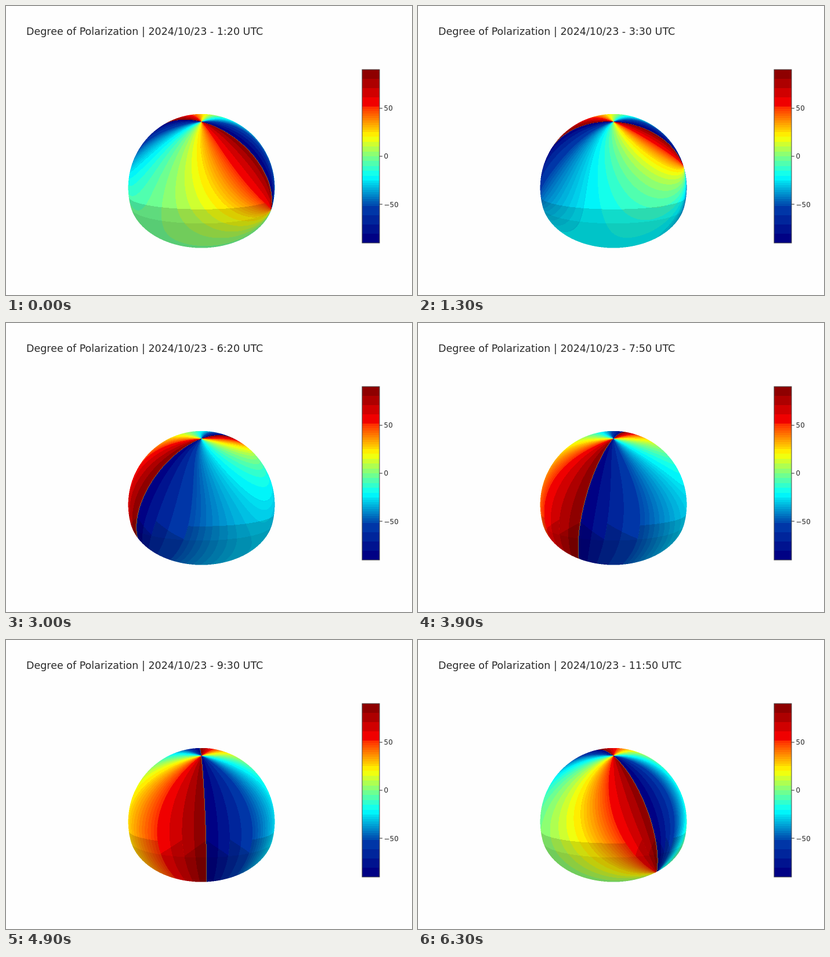
These frames come from a looping animation (700x500 px, 6.4 s). An HTML page with a canvas:

```html
<!DOCTYPE html>
<html>
<head>
<meta charset="utf-8">
<style>
html, body { margin: 0; width: 100%; height: 100%; overflow: hidden; background: #fefefe; }
canvas { display: block; }
</style>
</head>
<body>
<canvas id="stage" width="700" height="500"></canvas>
<script>
const ctx = document.getElementById('stage').getContext('2d');
const { sin, cos, abs, sqrt, floor, min, hypot, PI } = Math;
const RAD = PI / 180;

// Colour scale: angle in degrees, then r, g, b
const STOPS = [
  [-86, 0, 0, 131], [-76, 0, 18, 143], [-66, 0, 37, 155], [-56, 0, 55, 167],
  [-49, 0, 82, 178], [-21, 0, 255, 255], [0, 125, 255, 130], [20, 255, 255, 0],
  [50, 255, 52, 0], [56, 241, 0, 0], [66, 208, 0, 0], [76, 172, 0, 0], [86, 139, 0, 0]
];

function band(v) {
  const a = min(abs(v), 89.9);
  const [base, step] = a > 51.6 ? [51.6, 9.6] : a > 25.2 ? [25.2, 2.4] : [0, 5.04];
  return Math.sign(v) * (base + step * (floor((a - base) / step) + 0.5));
}

function colour(v) {
  v = Math.max(-86, min(86, band(v)));
  let i = 1;
  while (i < STOPS.length - 1 && STOPS[i][0] < v) i++;
  const a = STOPS[i - 1], b = STOPS[i];
  const k = (v - a[0]) / (b[0] - a[0]);
  return [1, 2, 3].map(c => a[c] + (b[c] - a[c]) * k);
}

const PALETTE = Array.from({ length: 901 }, (_, i) => colour((i - 450) / 5 || 0.01));

// Perspective view of a unit dome; axes are front, right, up
const BOX = { x: 206, y: 182, w: 262, h: 240 };
const TILT = 35.26 * RAD, FOCAL = 386.3, DIST = 1.845, RADIUS = 0.63;
const EYE_F = DIST * cos(TILT) / RADIUS;
const EYE_U = (DIST * sin(TILT) + RADIUS / 2) / RADIUS;

function castRay(px, py) {
  const r = (px - 337) / FOCAL, s = (260 - py) / FOCAL;
  const f = -cos(TILT) - sin(TILT) * s, u = -sin(TILT) + cos(TILT) * s;
  const a = f * f + r * r + u * u;
  const b = EYE_F * f + EYE_U * u;
  const disc = b * b - a * (EYE_F ** 2 + EYE_U ** 2 - 1);
  if (disc < 0) return null;
  const t = (-b - sqrt(disc)) / a;
  const F = EYE_F + t * f, R = t * r, U = EYE_U + t * u;
  if (U < 0) return null;
  const h = hypot(F, R) || 1e-6;
  return { c: F / h, s: R / h, h, u: U, light: U * cos(TILT) - F * sin(TILT) };
}

// Point seen in a pixel, with the covered part of the pixel as alpha
function samplePixel(x, y) {
  const hits = [[0.25, 0.25], [0.75, 0.25], [0.25, 0.75], [0.75, 0.75]]
    .map(([dx, dy]) => castRay(x + dx, y + dy)).filter(Boolean);
  if (!hits.length) return null;
  return { ...(castRay(x + 0.5, y + 0.5) || hits[0]), alpha: hits.length / 4 * 255 };
}

const dome = [];
for (let y = 0; y < BOX.h; y++)
  for (let x = 0; x < BOX.w; x++)
    dome.push(samplePixel(BOX.x + x, BOX.y + y));

function sunVector(minutes) {
  const lat = 40 * RAD, dec = -11.4 * RAD;
  const hour = (minutes - 395) / 4 * RAD;
  const south = cos(dec) * cos(hour) * sin(lat) - sin(dec) * cos(lat);
  const west = cos(dec) * sin(hour);
  const up = sin(lat) * sin(dec) + cos(lat) * cos(dec) * cos(hour);
  const k = Math.SQRT1_2;
  return [-k * (south + west), k * (south - west), up];
}

// Angle against the local meridian; the sideways part uses the sun's azimuth only
function polarization(p, [f, r, u]) {
  const along = (r * p.c - f * p.s) / hypot(f, r);
  const rise = u * p.h - p.u * (f * p.c + r * p.s);
  return Math.atan(-rise / (along || 1e-9)) / RAD;
}

function shade(p, v) {
  const a = abs(v);
  const limit = a > 51.6 ? -0.09 - 0.17 * ((90 - a) / 19.2 % 1) : -0.12;
  return p.light < -0.27 ? 0.8 : p.light < limit ? 0.86 : 1;
}

const image = ctx.createImageData(BOX.w, BOX.h);
const SEAM = [130, 200, 110];

function drawDome(minutes) {
  const sun = sunVector(minutes);
  const angles = dome.map(p => p && polarization(p, sun));
  dome.forEach((p, i) => {
    if (!p) return;
    const v = angles[i], next = angles[i + 1];
    const rgb = PALETTE[Math.round(v * 5) + 450];
    const light = shade(p, v);
    const seam = next !== null && v * next < 0 && abs(v) > 75 && abs(next) > 75 ? 0.5 : 0;
    for (let c = 0; c < 3; c++)
      image.data[i * 4 + c] = rgb[c] * light * (1 - seam) + SEAM[c] * seam;
    image.data[i * 4 + 3] = p.alpha;
  });
  ctx.putImageData(image, BOX.x, BOX.y);
}

function drawColorbar() {
  for (let y = 110; y < 410; y++) {
    ctx.fillStyle = `rgb(${colour(90 - (y + 0.5 - 110) * 0.6).map(Math.round)})`;
    ctx.fillRect(614, y, 30, 1);
  }
  ctx.strokeStyle = '#444';
  ctx.strokeRect(614, 110, 30, 300);
  ctx.fillStyle = '#2a2a2a';
  ctx.font = '12px "DejaVu Sans", sans-serif';
  for (const v of [50, 0, -50]) {
    const y = 260 - v / 0.6;
    ctx.fillRect(644, Math.round(y) - 0.5, 5, 1);
    ctx.fillText(String(v).replace('-', '\u2212'), 651.5, y + 4.3);
  }
}

function draw(step) {
  const minutes = 80 + step * 10;
  ctx.fillStyle = '#fefefe';
  ctx.fillRect(0, 0, 700, 500);
  drawDome(minutes);
  drawColorbar();
  ctx.font = '17.5px "DejaVu Sans", sans-serif';
  const clock = `${floor(minutes / 60)}:${minutes % 60}`;
  ctx.fillText(`Degree of Polarization | 2024/10/23 - ${clock} UTC`, 35, 50);
}

const start = performance.now();
let shown = -1;
function tick() {
  const step = floor((performance.now() - start) % 6400 / 100);
  if (step !== shown) draw(shown = step);
  requestAnimationFrame(tick);
}
tick();
</script>
</body>
</html>
```
